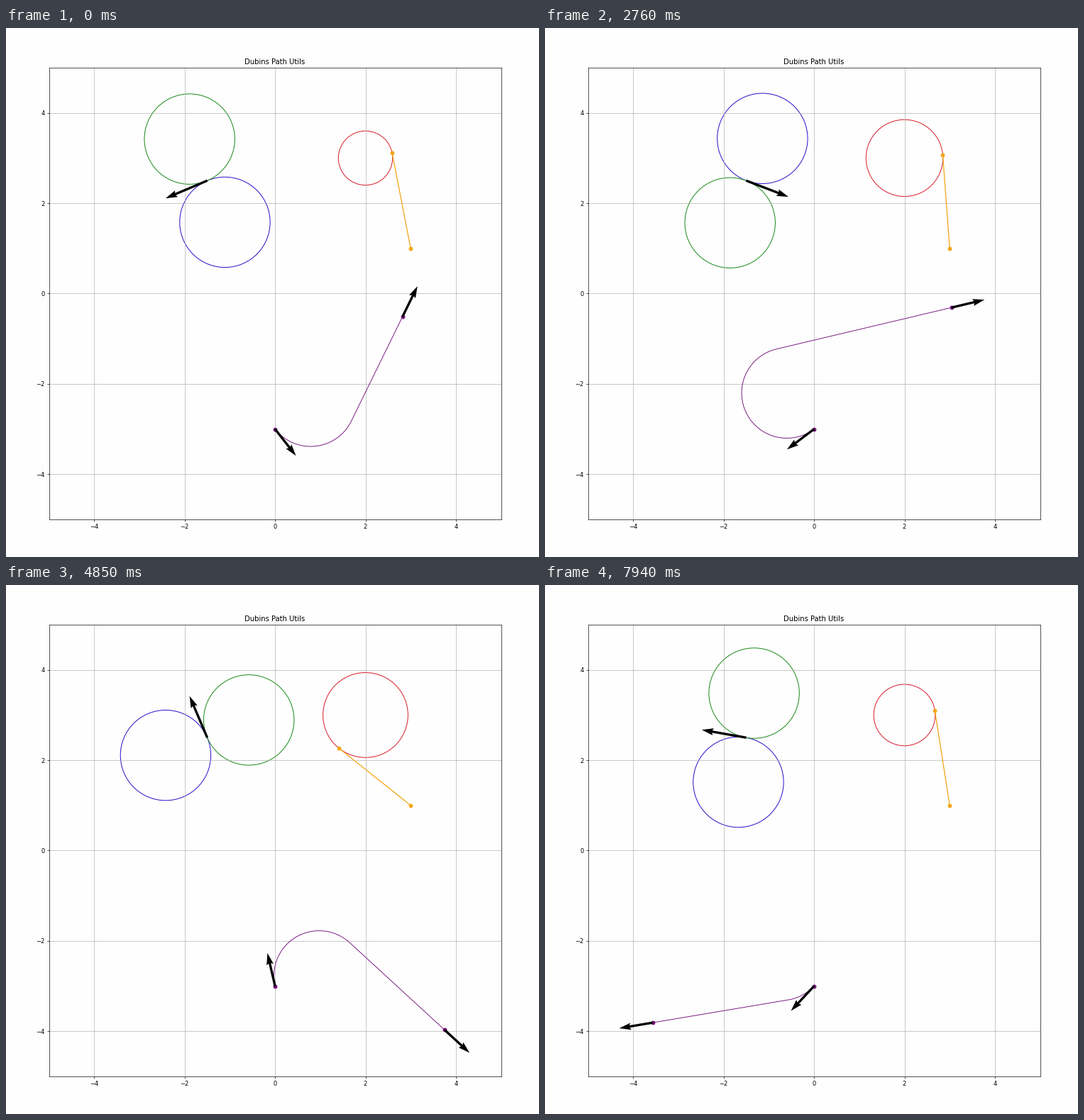
Write a matplotlib script that moves like this. It is 751 by 746 pixels and loops after 8 s.

```python
import numpy as np
import matplotlib.pyplot as plt
from matplotlib.animation import FuncAnimation

W, H, DPI = 751, 746, 100
STEP, LOOP = 40, 8000
PERIOD, LEAD = 1046, 376  # ms per scene, ms of the first one already gone
K = 0.604                 # scale of all point sizes
PAPER = "#fefefe"
BLUE, GREEN, RED = "#2a14cc", "#1c8c1c", "#d8202e"
ORANGE, PURPLE = "#f2a516", "#74107c"

POSE = np.array([-1.5, 2.5])    # shared point of the two turning circles
HUB = np.array([2.0, 3.0])      # centre of the growing circle
ANCHOR = np.array([3.0, 1.0])   # fixed end of the tangent line
START = np.array([0.0, -3.0])   # start of the path

# pose heading, signed hub radius (sign = tangent side), path heading, goal
SCENES = [
    (203, 0.60, -52, (2.82, -0.51)),
    (60, 0.70, 120, (-4.20, -1.50)),
    (-21, 0.85, 217, (3.04, -0.31)),
    (91, 0.885, 119, (-2.53, -2.21)),
    (113, -0.94, 103, (3.75, -3.97)),
    (-17, -0.40, 269, (-3.97, -0.97)),
    (52, -0.41, 80, (-3.08, -1.82)),
    (170, 0.68, 227, (-3.57, -3.81)),
]


def unit(a):
    return np.array([np.cos(a), np.sin(a)])


def tangent_point(r):
    d = ANCHOR - HUB
    a = np.arctan2(d[1], d[0]) + np.sign(r) * np.arccos(abs(r) / np.hypot(*d))
    return HUB + abs(r) * unit(a)


def turn_and_go(heading, goal, turn):
    """Unit arc then a straight run: length, points and end heading."""
    centre = START + unit(heading + turn * np.pi / 2)
    d = goal - centre
    run = np.sqrt(d @ d - 1)
    end = np.arctan2(d[1], d[0]) + turn * np.arctan2(1, run)
    sweep = (turn * (end - heading)) % (2 * np.pi)
    a = heading - turn * np.pi / 2 + turn * np.linspace(0, sweep, 60)
    arc = centre + unit(a).T
    return sweep + run, np.vstack([arc, goal]), end


def shortest(heading, goal):
    routes = [turn_and_go(heading, goal, turn) for turn in (1, -1)]
    return min(routes, key=lambda route: route[0])[1:]


fig = plt.figure(figsize=(W / DPI, H / DPI), dpi=DPI, facecolor=PAPER)
ax = fig.add_axes([60.6 / W, 1 - 693 / H, 637 / W, 637 / H], facecolor=PAPER)
ax.set(xlim=(-5, 5), ylim=(-5, 5),
       xticks=range(-4, 5, 2), yticks=range(-4, 5, 2))
ax.tick_params(labelsize=10 * K, length=3.5 * K, width=0.8 * K, pad=3.5 * K)
ax.grid(True, color="#b0b0b0", lw=0.8 * K)
ax.set_title("Dubins Path Utils", fontsize=12 * K, pad=6 * K)
for spine in ax.spines.values():
    spine.set_linewidth(0.8 * K)


def ring(color, centre=(0, 0)):
    return ax.add_patch(plt.Circle(centre, 1, fill=False, ec=color, lw=1.2 * K))


def line(color, width, **kw):
    return ax.plot([], [], color=color, lw=width * K,
                   ms=6 * K, mew=K, **kw)[0]


def arrow(at):
    return ax.quiver([at[0]], [at[1]], [1], [0], angles="xy", scale_units="xy",
                     scale=1, width=0.0052, color="black", zorder=3)


left, right, hub = ring(BLUE), ring(GREEN), ring(RED, HUB)
tangent = line(ORANGE, 1.5, marker="o")
path = line(PURPLE, 1.1)
dots = line(PURPLE, 0, marker="o")
pose_arrow, start_arrow, goal_arrow = arrow(POSE), arrow(START), arrow(START)


def aim(q, angle, length):
    u, v = length * unit(angle)
    q.set_UVC([u], [v])


def update(i):
    pose, r, heading, goal = SCENES[(i * STEP + LEAD) // PERIOD]
    pose, heading, goal = np.radians(pose), np.radians(heading), np.array(goal)

    normal = unit(pose + np.pi / 2)
    left.center = POSE + normal
    right.center = POSE - normal
    aim(pose_arrow, pose, 1)

    hub.set_radius(abs(r))
    tangent.set_data(*np.array([ANCHOR, tangent_point(r)]).T)

    points, end = shortest(heading, goal)
    path.set_data(*points.T)
    dots.set_data(*np.array([START, goal]).T)
    aim(start_arrow, heading, 0.75)
    goal_arrow.set_offsets([goal])
    aim(goal_arrow, end, 0.75)
    return left, right, hub, tangent, path, dots


anim = FuncAnimation(fig, update, frames=LOOP // STEP, interval=STEP,
                     init_func=lambda: update(0), repeat=True, repeat_delay=0)
plt.show()
```
